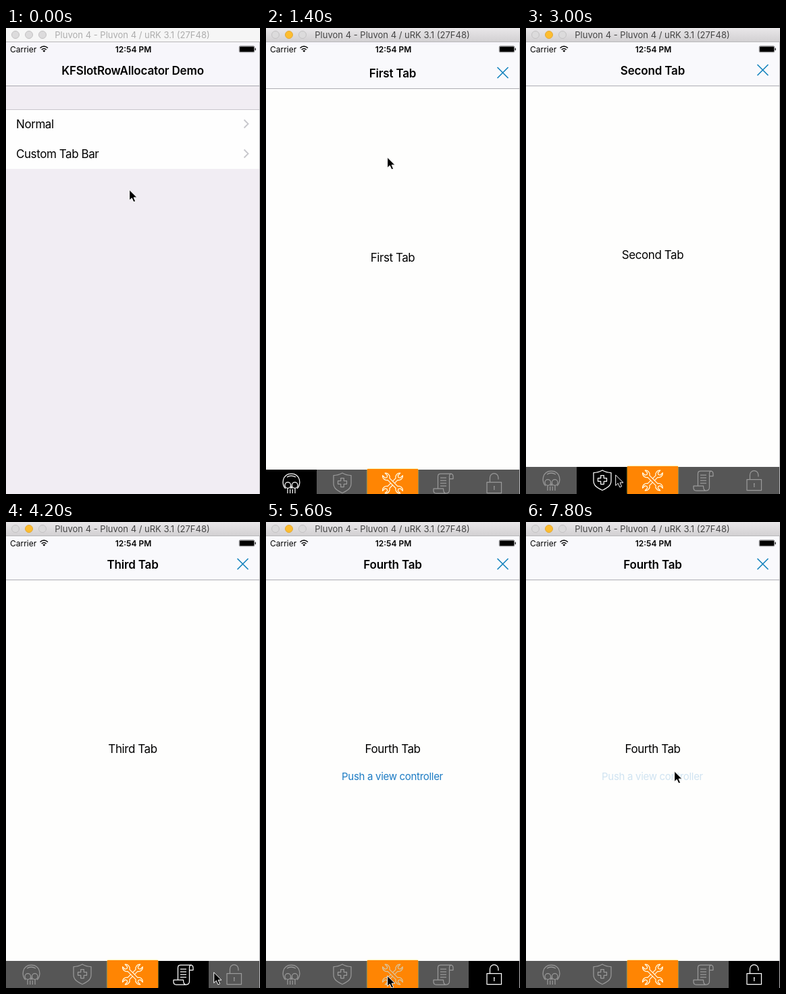
These frames come from a looping animation (376 px wide and 688 px high, 8000 ms). An HTML page:

```html
<!DOCTYPE html>
<html lang="en">
<head>
<meta charset="utf-8">
<title>Tab bar demo</title>
<style>
  html, body { margin: 0; width: 100%; height: 100%; overflow: hidden; background: #f1edf3; }
  svg { display: block; width: 376px; height: 688px; font: 17px Inter, sans-serif; }
  text { letter-spacing: -.025em; }
  .mid { text-anchor: middle; }
  .nav { font-weight: 600; letter-spacing: -.01em; }
  .status { font-size: 12px; letter-spacing: 0; }
  .icon { fill: none; stroke: #999; stroke-width: 1.25; stroke-linejoin: round; }
  .tab.on rect { fill: #000; }
  .tab.on .icon { stroke: #fff; }
  .tab rect { fill: #565656; }
  .light { fill: #dcdbdc; stroke: #c3c2c3; }
  .active #minimize { fill: #fdbd2f; stroke: #e3a93a; }
  #bar { fill: #f6f6f6; }
  .active #bar { fill: url(#chrome); }
  #caption { font-size: 13px; letter-spacing: 0; fill: #adadad; }
  .active #caption { fill: #444; }
  #push { font-size: 15px; letter-spacing: -.02em; fill: #1b7bc4; }
  #center { fill: #ff8503; filter: drop-shadow(0 0 1.2px #fff04a); }
</style>
</head>
<body>
<svg viewBox="0 0 376 688">
  <defs>
    <linearGradient id="chrome" x2="0" y2="1">
      <stop stop-color="#e9e7e9"/><stop offset="1" stop-color="#d2d0d2"/>
    </linearGradient>
    <path id="wrench" d="M-2 8.5V-8.5A6 6 0 0 1-2.5-18.5V-13.5L0-12 2.5-13.5V-18.5A6 6 0 0 1 2-8.5V8.5A6 6 0 0 1 2.5 18.5V13.5L0 12-2.5 13.5V18.5A6 6 0 0 1-2 8.5Z"/>
  </defs>

  <g id="list">
    <rect width="376" height="688" fill="#f1edf3"/>
    <rect y="20" width="376" height="65" fill="#f7f6fb"/>
    <path d="M0 85.5H376" stroke="#aaa9b0"/>
    <text class="mid nav" x="187.5" y="69">KFSlotRowAllocator Demo</text>
    <rect y="121" width="376" height="87" fill="#fefefe"/>
    <rect id="row" y="164.5" width="376" height="43.5" fill="#d9d9d9"/>
    <path d="M0 120.5H376" stroke="#c8c6cc"/>
    <text x="15" y="148">Normal</text>
    <text x="15" y="192">Custom Tab Bar</text>
    <path d="M352.5 135.5l6 6-6 6M352.5 179.5l6 6-6 6" fill="none" stroke="#c7c7cc" stroke-width="1.8"/>
  </g>

  <g id="modal">
    <rect y="21" width="376" height="667" fill="#fefefd"/>
    <rect y="21" width="376" height="64" fill="#f9f9fc"/>
    <path d="M0 85.5H376" stroke="#adadb3"/>
    <text id="heading" class="mid nav" x="187.5" y="69"></text>
    <path d="M342.500 54l16 16m0-16l-16 16" stroke="#1282bd" stroke-width="1.6"/>
    <text id="label" class="mid" x="187.5" y="340.5"></text>
    <text id="push" class="mid" x="187" y="381">Push a view controller</text>

    <g class="tab">
      <rect y="648" width="75" height="40"/>
      <g class="icon">
        <path d="M29 676C22.500 671 23.500 654 37.500 654S52.500 671 46 676M32 676v7m3.700-6v6m3.600-6v6m3.700-7v7M36 676l1.500-3 1.500 3M31 659q6-4 13 0"/>
        <circle cx="32.300" cy="671" r="4.300"/><circle cx="42.700" cy="671" r="4.300"/>
      </g>
    </g>
    <g class="tab">
      <rect x="75" y="648" width="75" height="40"/>
      <path class="icon" d="M100 656.500q7 0 13-3.500 6 3.500 13 3.500v12c0 8-7 11-13 14-6-3-13-6-13-14ZM110.700 660.500h4.600v4.200h4.200v4.600h-4.200v4.200h-4.600v-4.200h-4.200v-4.600h4.200Z"/>
    </g>
    <g class="tab">
      <rect x="225" y="648" width="75" height="40"/>
      <path class="icon" d="M254.500 676V658q0-4 4-4H273q4 0 4 4v3.500H271.500V678q0 5-5 5H252q-4 0-4-4v-3H262.500q0 7 4 7M271.500 661.500V658q0-4 3-4M258 660h9M258 664h9M258 668h9M258 672h9"/>
    </g>
    <g class="tab">
      <rect x="300" y="648" width="76" height="40"/>
      <path class="icon" d="M327 666.500h21.500v16H327ZM331.500 666.500V660a6.200 6.500 0 0 1 12.400 0v2.500M337.800 672v6M337 673h1.600"/>
    </g>
    <rect id="center" x="150" y="647" width="75" height="41"/>
    <g id="tools" class="icon" transform="translate(187.5 668)" style="fill:#ff8503">
      <use href="#wrench" transform="rotate(45)"/>
      <use href="#wrench" transform="rotate(-45)"/>
    </g>
  </g>

  <g id="statusBar">
    <text class="status" x="6" y="35.5">Carrier</text>
    <path d="M50.500 29.500q5.500-5 11.500 0M52.700 32q3.500-3 7 0" fill="none" stroke="#000" stroke-width="1.6"/>
    <path d="M54.300 33.500q2-1.500 4 0l-2 2.200Z"/>
    <text class="status mid" x="188.5" y="35.5" style="font-weight:600">12:54 PM</text>
    <rect x="345.25" y="26.750" width="22.500" height="9" rx="1.500" fill="none" stroke="#000" stroke-width=".5"/>
    <rect x="346" y="27.500" width="21" height="7.500" rx=".7"/>
    <rect x="368.500" y="29.500" width="1.200" height="3.500" rx=".6"/>
  </g>

  <g id="window">
    <rect id="bar" width="376" height="20.5"/>
    <path d="M0 20.5H376" stroke="#b9b8ba"/>
    <circle class="light" cx="14" cy="10" r="5.5"/>
    <circle class="light" cx="34" cy="10" r="5.5" id="minimize"/>
    <circle class="light" cx="54" cy="10" r="5.5"/>
    <text id="caption" class="mid" x="187" y="15">Pluvon 4 - Pluvon 4 / uRK 3.1 (27F48)</text>
    <path d="M375.5 21V688" stroke="#b4b3b6"/>
  </g>

  <path id="cursor" d="M.7-1V14.500L4.300 11.200 6.900 17 9.600 15.800 7.100 10.200H11.900Z" stroke="#fff"/>
</svg>

<script>
const $ = id => document.getElementById(id);
const LOOP = 8000;
const names = ['First Tab', 'Second Tab', 'Third Tab', 'Fourth Tab'];
const tabTimes = [0, 2990, 3950, 4600];
const tabs = document.querySelectorAll('.tab');

// Pointer stops: time, x, y
const stops = [
  [100, 182, 240], [850, 179, 192], [1850, 179, 192], [2250, 160, 420],
  [2350, 160, 420], [2800, 132, 661], [3100, 132, 661], [3600, 264, 666],
  [3950, 264, 666], [4200, 307, 666], [4450, 333, 668], [4850, 333, 668],
  [5500, 179, 671], [6650, 179, 671], [7000, 311, 560], [7400, 275, 410],
  [7700, 219, 369]
];

function pointerAt(t) {
  const next = stops.findIndex(s => s[0] > t);
  if (next === 0) return stops[0].slice(1);
  if (next < 0) return stops.at(-1).slice(1);
  const [t0, x0, y0] = stops[next - 1], [t1, x1, y1] = stops[next];
  const p = (t - t0) / (t1 - t0), e = p * p * (3 - 2 * p);
  return [x0 + (x1 - x0) * e, y0 + (y1 - y0) * e];
}

// Critically damped spring: the share of the slide still to go
function slideLeft(t) {
  const s = Math.max(0, t - 1000) / 1000 * 18;
  return (1 + s) * Math.exp(-s);
}

function draw(now) {
  const t = now % LOOP;
  const current = tabTimes.findLastIndex(start => t >= start);

  $('window').classList.toggle('active', t >= 300);
  $('row').style.opacity = t >= 940 ? 1 : 0;
  $('modal').setAttribute('transform', `translate(0 ${667 * slideLeft(t)})`);
  $('heading').textContent = $('label').textContent = names[current];
  tabs.forEach((tab, i) => tab.classList.toggle('on', i === current));

  $('push').style.display = current === 3 ? '' : 'none';
  $('push').style.opacity = t >= 7750 ? .2 : 1;
  $('tools').style.stroke = t >= 5550 && t < 6650 ? '#d9c5a0' : '#fffbe6';
  $('cursor').setAttribute('transform', `translate(${pointerAt(t)})`);
  requestAnimationFrame(() => draw(performance.now()));
}
draw(performance.now());
</script>
</body>
</html>
```
